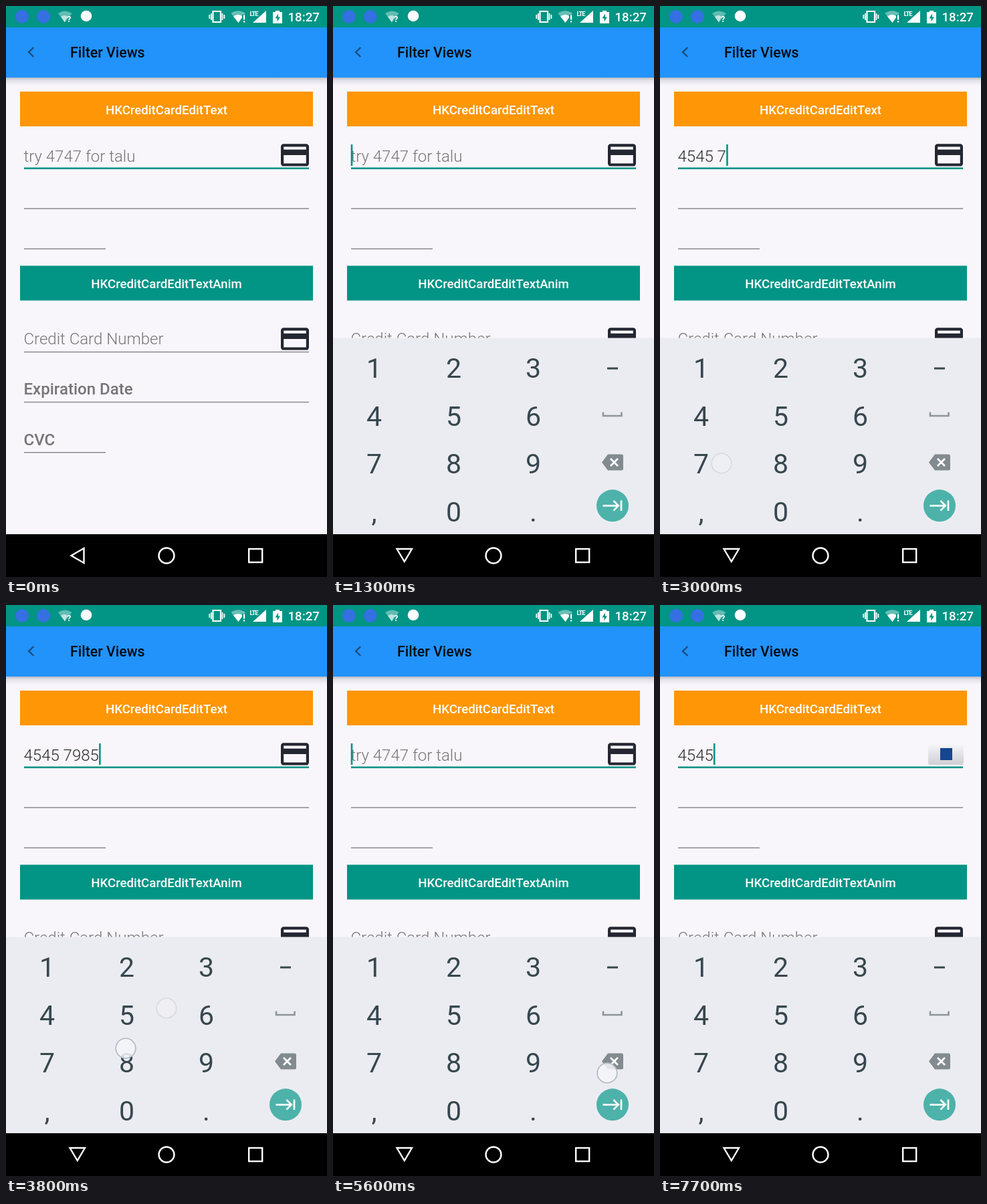
Write an HTML page that moves like this. It is 480 px wide and 854 px high and loops after 8000 ms.

```html
<!DOCTYPE html>
<html lang="en">
<head>
<meta charset="utf-8">
<title>Filter Views</title>
<style>
  html, body { margin: 0; width: 100%; height: 100%; overflow: hidden; background: #000; }
  svg { display: block; width: 100vw; height: 100vh; }
  text { font-family: Roboto, "Noto Sans", sans-serif; }
  .mid { text-anchor: middle; }
  .btn { font-size: 18.67px; font-weight: 500; fill: #fff; text-anchor: middle; }
  .field { font-size: 24px; font-weight: 300; fill: #767578; }
  .label { font-size: 24px; font-weight: 500; fill: #757477; }
  .key { font-size: 41px; fill: #37474f; text-anchor: middle; }
  .line { fill: none; stroke: #8b898d; stroke-width: 1.4; }
  .nav { fill: none; stroke: #fff; stroke-width: 2.4; }
</style>
</head>
<body>
<svg viewBox="0 0 480 854" preserveAspectRatio="none">
  <defs>
    <linearGradient id="shade" x2="0" y2="1">
      <stop offset="0" stop-color="#3c4660" stop-opacity=".34"/>
      <stop offset=".35" stop-color="#3c4660" stop-opacity=".12"/>
      <stop offset="1" stop-color="#3c4660" stop-opacity="0"/>
    </linearGradient>
    <linearGradient id="plate" x2="0" y2="1">
      <stop offset="0" stop-color="#f6f5f8"/>
      <stop offset="1" stop-color="#cfced3"/>
    </linearGradient>
    <path id="card" fill="#242731" fill-rule="evenodd"
      d="M20 4H4a2 2 0 0 0-2 2v12a2 2 0 0 0 2 2h16a2 2 0 0 0 2-2V6a2 2 0 0 0-2-2zM20 18H4v-6h16zM20 8H4V6h16z"/>
  </defs>

  <rect width="480" height="854" fill="#f8f6fa"/>

  <!-- status bar -->
  <rect width="480" height="32" fill="#029485"/>
  <g fill="#3470e2"><circle cx="24" cy="16" r="10"/><circle cx="56" cy="16" r="10"/></g>
  <g fill="#fff">
    <path d="M78 11Q88 4 98.500 11L88 24.500z" opacity=".38"/>
    <path d="M82 16Q88 12 92 16L88 24.500z" opacity=".6"/>
    <text x="91" y="24" font-size="13" font-weight="700">?</text>
    <circle cx="120" cy="15" r="8.300"/>
    <path d="M309.500 8h11.500v16h-11.500z" fill="none" stroke="#fff" stroke-width="2.200"/>
    <path d="M304.300 13v6M307 11v10M323.500 11v10M326.400 13v6" stroke="#fff" stroke-width="1.800"/>
    <path d="M336.500 11Q347 3.500 358 11L347.500 25z" opacity=".4"/>
    <path d="M340 15.500Q347 10.500 354 15.500L347.500 25z"/>
    <path d="M353 13h7v12h-7z" fill="#029485"/>
    <path d="M355 13.500h2.200v7h-2.200zM355 22.300h2.200v2.300h-2.200z"/>
    <text x="364.500" y="14.500" font-size="9.500" font-weight="700" letter-spacing="-1.200">LTE</text>
    <path d="M389 7v18h-20z"/>
    <path d="M403 7h6v2h4v17h-14V9h4z"/>
  </g>
  <path d="M407 11.500l-4.500 7h3v5l4.500-7h-3z" fill="#029485"/>
  <text x="421.500" y="23" font-size="18.670" font-weight="500" fill="#fff">18:27</text>

  <!-- app bar -->
  <rect y="32" width="480" height="75" fill="#2193fa"/>
  <rect y="107" width="480" height="12" fill="url(#shade)"/>
  <path d="M41.300 62l-7.200 7 7.200 7" fill="none" stroke="#1c4a78" stroke-width="2.300"/>
  <text x="96" y="77.300" font-size="21.330" font-weight="500" fill="#050a10">Filter Views</text>

  <!-- form -->
  <rect x="21" y="128" width="438" height="52" fill="#ff9605"/>
  <text class="btn" x="240" y="161.700">HKCreditCardEditText</text>
  <rect x="21" y="388.500" width="438" height="52" fill="#029485"/>
  <text class="btn" x="240" y="421.700">HKCreditCardEditTextAnim</text>
  <path class="line" d="M27 303h426M27 363.300h122M27 517.500h426M27 592.500h426M27 667.700h122"/>
  <rect x="27" y="241.500" width="426" height="2.600" fill="#029485"/>
  <text class="field" id="hint" x="26.500" y="233">try 4747 for talu</text>
  <text class="field" id="entry" x="26.500" y="233" style="fill:#2b2b2e"></text>
  <rect id="caret" y="207" width="2.600" height="32" fill="#029485"/>
  <use id="plain" href="#card" transform="translate(406.800 198) scale(2.100 2.080)"/>
  <g id="match">
    <rect x="401" y="208" width="53" height="31" rx="3" fill="url(#plate)"/>
    <rect x="419" y="214" width="18" height="18" fill="#16468f"/>
  </g>
  <text class="field" x="26.500" y="506">Credit Card Number</text>
  <use href="#card" transform="translate(406.800 473) scale(2.100 2.080)"/>
  <text class="label" x="26.500" y="581">Expiration Date</text>
  <text class="label" x="26.500" y="656.500">CVC</text>

  <rect y="790" width="480" height="64" fill="#000"/>

  <!-- keyboard -->
  <g id="board">
    <rect y="496.500" width="480" height="293.500" fill="#ebecf1"/>
    <rect id="press" width="118.500" height="71.400" fill="#dad9df"/>
    <g id="keys"></g>
    <path d="M410 542h16" stroke="#37474f" stroke-width="3"/>
    <path d="M404 607.500v5.500h27.500v-5.500" fill="none" stroke="#8d959a" stroke-width="2.600"/>
    <path d="M411 670.500h20.500a2.500 2.500 0 0 1 2.500 2.500v19a2.500 2.500 0 0 1-2.500 2.500h-20.500l-9-12z" fill="#828b90"/>
    <path d="M415 677l11 11M426 677l-11 11" stroke="#fff" stroke-width="2.800"/>
    <circle cx="418" cy="747.300" r="24" fill="#4db2aa"/>
    <path d="M403.500 747.300h23M419.500 740l7.300 7.300-7.300 7.300M431 739.500v15.600" fill="none" stroke="#fff" stroke-width="2.700"/>
  </g>

  <!-- navigation bar icons -->
  <path class="nav" id="back"/>
  <circle class="nav" cx="240" cy="822" r="11.500"/>
  <rect class="nav" x="363.200" y="812" width="20" height="20"/>

  <g id="dots"></g>
</svg>
<script>
const LOOP = 8000, STEP = 100, NS = "http://www.w3.org/2000/svg";
const $ = id => document.getElementById(id);

function add(parent, tag, attrs, label = "") {
  const el = document.createElementNS(NS, tag);
  for (const k in attrs) el.setAttribute(k, attrs[k]);
  el.textContent = label;
  return parent.appendChild(el);
}

const rows = ["123", "456", "789", ",0."];
rows.forEach((row, r) => [...row].forEach((ch, c) =>
  add($("keys"), "text", { class: "key", x: 61.5 + 119 * c, y: 556 + 71.5 * r }, ch)));

// key, down, up, x, y, optional time of typing
const taps = [
  ["", 1000, 1100, 286, 233],
  ["4", 1700, 1900, 92, 618],
  ["5", 2000, 2200, 205, 614],
  ["4", 2200, 2400, 95, 620],
  ["5", 2500, 2700, 208, 616],
  ["7", 2800, 3000, 92, 684],
  ["9", 3100, 3300, 290, 678],
  ["8", 3400, 3600, 190, 676],
  ["5", 3600, 3800, 240, 603],
  ["8", 3800, 3900, 179, 663],
  ["<", 4600, 5700, 410, 700],
  ["4", 6300, 6400, 88, 618, 6300],
  ["5", 7000, 7200, 205, 614],
  ["4", 7200, 7400, 92, 617],
  ["5", 7400, 7600, 206, 615]
].map(([key, down, up, x, y, at = up]) => ({
  key, down, up, x, y, at,
  dot: add($("dots"), "circle", { cx: x, cy: y, r: 14.8, fill: "#f6f5f9",
    "fill-opacity": .86, stroke: "#b4bdc9", "stroke-width": 1.8 })
}));

// edits: typed digits, then a held delete key that repeats
const edits = taps.filter(p => /\d/.test(p.key)).map(p => ({ at: p.at, ch: p.key }));
edits.push({ at: 4700 });
for (let i = 0; i < 8; i++) edits.push({ at: 4950 + 85 * i });
edits.sort((a, b) => a.at - b.at);

const show = (el, on) => el.style.display = on ? "" : "none";

function drawField(t) {
  let digits = "", last = 1200;
  for (const e of edits) {
    if (e.at > t) break;
    digits = e.ch ? digits + e.ch : digits.slice(0, -1);
    last = e.at;
  }
  $("entry").textContent = digits.replace(/(.{4})(?=.)/g, "$1 ");
  show($("hint"), !digits);
  show($("match"), digits.length === 4);
  show($("plain"), digits.length !== 4);
  $("caret").setAttribute("x", 26.7 + (digits ? $("entry").getComputedTextLength() : 0));
  show($("caret"), t >= last && (t - last) % 1000 < 500);
}

function drawBoard(t) {
  const p = Math.min(1, Math.max(0, (t - 1000) / 200));
  $("board").setAttribute("transform", `translate(0 ${164 * (1 - p)})`);
  $("board").setAttribute("opacity", p);
  $("back").setAttribute("d", p ? "M95.500 812h22.500l-11.200 19z" : "M97.500 822l19-11v22z");
}

function drawTaps(t) {
  let held = null;
  for (const p of taps) {
    const on = t >= p.down && t < p.up;
    show(p.dot, t >= p.down && t < p.up + 100);
    p.dot.setAttribute("opacity", on ? 1 : .35);
    const end = p.key === "<" ? p.up - 100 : p.up;
    if (p.key && t >= p.down + 100 && t < end) held = p.key;
  }
  show($("press"), held);
  if (!held) return;
  const row = held === "<" ? 2 : rows.findIndex(r => r.includes(held));
  const col = held === "<" ? 3 : rows[row].indexOf(held);
  $("press").setAttribute("x", 3 + 118.7 * col);
  $("press").setAttribute("y", 504.300 + 71.4 * row);
}

const start = performance.now();
function frame(now) {
  // the screen refreshes ten times a second
  const t = Math.floor(Math.max(0, now - start) % LOOP / STEP) * STEP;
  drawField(t);
  drawBoard(t);
  drawTaps(t);
  requestAnimationFrame(frame);
}
frame(start);
</script>
</body>
</html>
```
